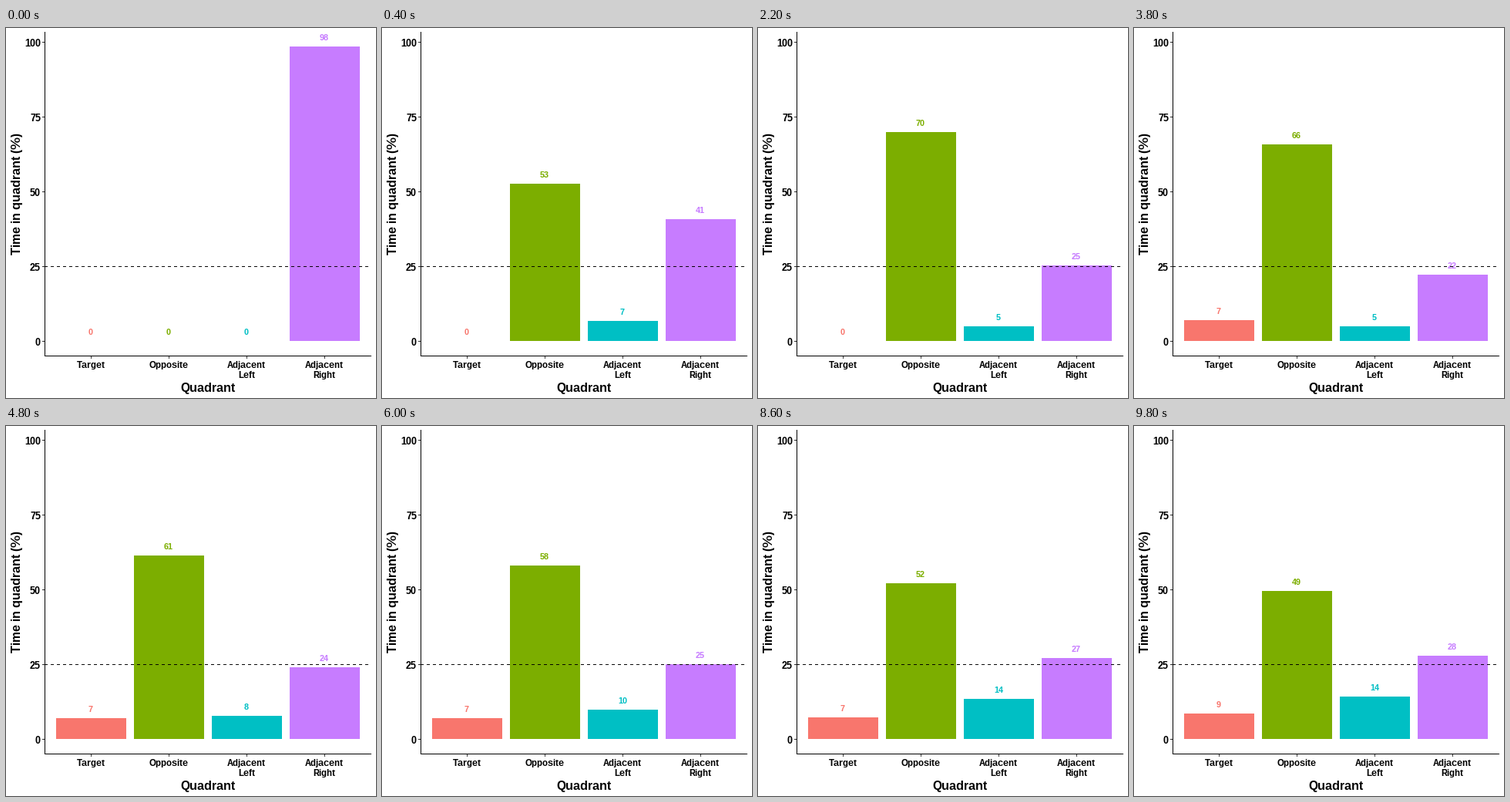
Animation of 480x480 px, one loop 10 s. Source, as a matplotlib script:

```python
import numpy as np
import matplotlib.pyplot as plt
from matplotlib.animation import FuncAnimation
from matplotlib.patches import Rectangle

SIZE, DPI = 480, 80
PT = 72 / DPI  # points per pixel
FRAMES, STEP = 50, 200
BASE, SCALE = 406, 3.88  # pixel row of 0 %, pixels per percent
BAR_X, BAR_W, BAR_GAP = 65, 91, 101
COLORS = ["#F8766D", "#7CAE00", "#00BFC4", "#C77CFF"]
NAMES = ["Target", "Opposite", "Adjacent\nLeft", "Adjacent\nRight"]
START = 0.984  # time already spent when the first frame is drawn

# Percent in target, opposite and left at a few moments; right is the rest
KEYS = {0: (0, 0, 0), 6: (0, 67.3, 8.75), 11: (0, 69.85, 4.95),
        19: (7, 65.8, 4.95), 30: (7, 58.1, 9.8), 37: (5.7, 55.7, 12.6),
        49: (8.55, 49.45, 14.2)}


def shares(n):
    """Running percent per quadrant: time adds up evenly between keys."""
    times = np.array(list(KEYS)) + START
    clock = n + START
    spent = [np.interp(clock, times, times * np.array(pct))
             for pct in zip(*KEYS.values())]
    spent.append(100 * clock - sum(spent))
    return np.array(spent) / max(1, clock)


plt.rcParams.update({"font.family": "Liberation Sans", "font.weight": "bold",
                     "text.hinting": "native", "text.hinting_factor": 1})

fig = plt.figure(figsize=(SIZE / DPI, SIZE / DPI), dpi=DPI, facecolor="white")
ax = fig.add_axes([0, 0, 1, 1])
ax.set_xlim(0, SIZE)
ax.set_ylim(SIZE, 0)
ax.axis("off")


def line(x0, y0, x1, y1, color="black", **kw):
    ax.plot([x0, x1], [y0, y1], color=color, lw=PT, snap=False,
            solid_capstyle="butt", dash_capstyle="butt", **kw)


def text(x, y, s, px, color="black", ha="center", **kw):
    return ax.text(x, y, s, fontsize=px * PT, color=color, ha=ha,
                   va="baseline", **kw)


for pct in range(0, 101, 25):
    y = BASE - round(SCALE * pct)
    line(47, y + 0.5, 50, y + 0.5, "#333333")
    text(45, y + 6, str(pct), 13, ha="right")

line(50.5, 5, 50.5, 426)
line(50, 425.5, 474, 425.5)
line(50, 309.5, 474, 309.5, ls=(0, (4, 4)), zorder=5)
text(261.5, 472, "Quadrant", 16)
text(19, 214.5, "Time in quadrant (%)", 16, rotation=90,
     rotation_mode="anchor")

bars, labels = [], []
for i, (name, color) in enumerate(zip(NAMES, COLORS)):
    x = BAR_X + i * BAR_GAP
    mid = x + BAR_W / 2
    line(mid, 426, mid, 429, "#333333")
    for row, word in enumerate(name.split("\n")):
        text(mid - 0.5, 441 + 13 * row, word, 12)
    bar = Rectangle((x, BASE), BAR_W, 0, fc=color, ec="none", aa=False)
    bars.append(ax.add_patch(bar))
    labels.append(text(mid - 0.5, BASE - 8, "0", 11, color))


def draw(n):
    for bar, label, pct in zip(bars, labels, shares(n)):
        height = round(SCALE * pct)
        bar.set_y(BASE - height)
        bar.set_height(height)
        label.set_y(BASE - height - 8)
        label.set_text(f"{abs(pct):.0f}")
    return bars + labels


anim = FuncAnimation(fig, draw, frames=FRAMES, interval=STEP,
                     repeat=True, repeat_delay=0, blit=False)
plt.show()
```
